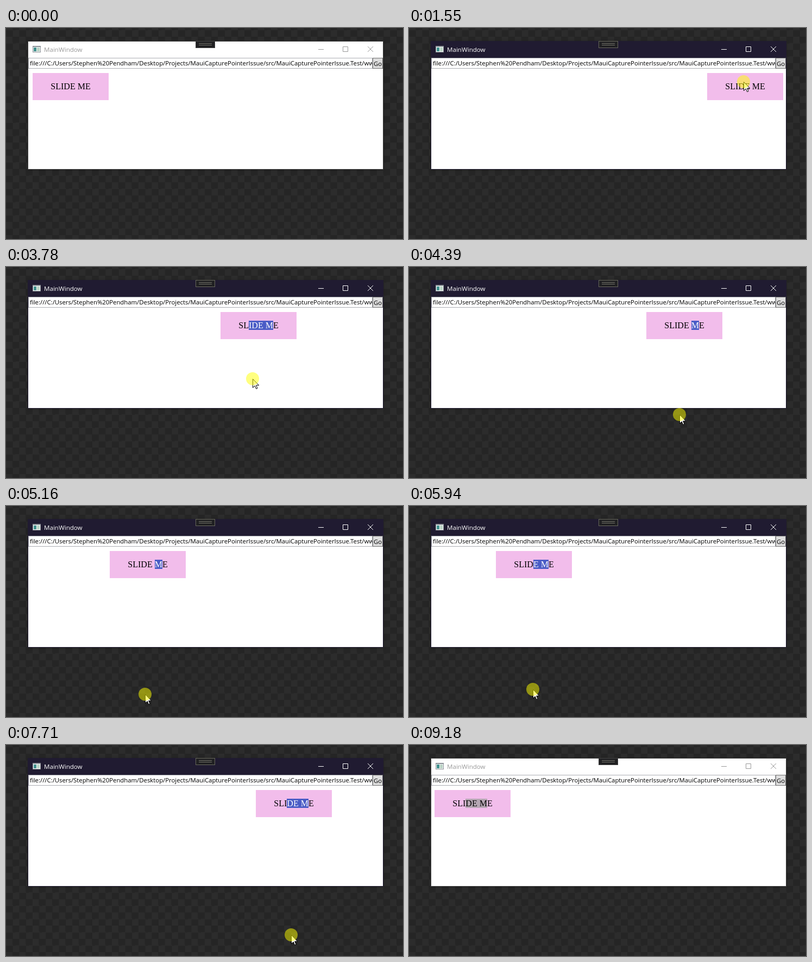
An HTML page that plays this animation: 731x389 px, repeating every 9.34 s.

```html
<!DOCTYPE html>
<html lang="en">
<head>
<meta charset="utf-8">
<title>Slide me</title>
<style>
html, body { margin: 0; width: 100%; height: 100%; overflow: hidden; }
body {
  position: relative;
  background: repeating-conic-gradient(#252525 0 25%, #2c2c2c 0 50%) 0 -8.4px / 24.4px 24.4px;
  font: 11.35px/19px "Open Sans", "Noto Sans", sans-serif;
  color: #000;
}
div, svg { position: absolute; box-sizing: border-box; }
#win {
  left: 41px; top: 25px; width: 653px; height: 235px;
  background: #fff; overflow: hidden;
  box-shadow: 0 0 0 1px #444, 0 1px 6px rgba(0, 0, 0, .3);
}
.active #win { box-shadow: 0 0 0 1px #201b31, 0 1px 6px rgba(0, 0, 0, .3); }
#bar { width: 653px; height: 30px; background: #fff; color: #999; }
.active #bar { background: #201b31; color: #fff; }
#name { left: 29px; top: 5px; font-size: 11.6px; }
#bar svg { left: 0; top: 0; }
#grip { left: 349px; top: 24px; width: 36px; height: 13px; background: #202022; border: 1px solid #444; }
.active #grip { border-color: #66665c; }
#grip::after {
  content: ""; position: absolute; left: 5px; top: 3px; width: 24px; height: 2px;
  border: solid #77776e; border-width: 1px 0;
}
#url {
  left: 0; top: 30px; width: 634px; height: 20px; padding-left: 2px; line-height: 17px;
  border: 1px solid #abadb3; overflow: hidden; white-space: nowrap;
}
#go { left: 634px; top: 30px; width: 19px; height: 20px; background: #ddd; border: 1px solid #707070; text-align: center; }
#go span { margin: 0 -2px; }
#box {
  left: 0; top: 58px; width: 140px; height: 50px; background: #f2bdeb;
  font: 16px/50px "Liberation Serif", serif; text-align: center; white-space: pre;
}
#sel { background: #b5a7b3; }
.active #sel { background: #4a5cc6; color: #fff; }
#mouse { left: 0; top: 0; overflow: visible; }
</style>
</head>
<body>
<div id="win">
  <div id="bar">
    <svg width="653" height="30" fill="none" stroke="currentColor">
      <g stroke="none">
        <path fill="#8a9096" d="M8 8h15v12H8z"/>
        <path fill="#f4f6f7" d="M9 10h13v9H9z"/>
        <path fill="#3f8f8c" d="M10 11h5v7h-5z"/>
        <path fill="#b9d3c4" d="M16 11h5v7h-5z"/>
      </g>
      <path d="M534 14.5h10M579.5 9.5h9v9h-9zM625 9l10 10M635 9l-10 10"/>
    </svg>
    <div id="name">MainWindow</div>
  </div>
  <div id="url">file:///C:/Users/Stephen%20Pendham/Desktop/Projects/MauiCapturePointerIssue/src/MauiCapturePointerIssue.Test/www</div>
  <div id="go"><span>Go</span></div>
  <div id="box"><span id="head"></span><span id="sel"></span><span id="tail"></span></div>
</div>
<div id="grip"></div>
<svg id="mouse" width="1" height="1">
  <path d="M.5 .5V16.5L4.2 13 6.6 18.6 9 17.6 6.6 12.1H11.6Z" fill="#fff" stroke="#000"/>
  <circle id="halo" r="12" fill="#ff0" opacity=".5"/>
</svg>
<script>
const LOOP = 9340, STEP = 1000 / 13, LABEL = "SLIDE ME", ANCHOR = 7;
const LEFT = 47, RIGHT = 550, PRESS = 860, STOP = 8010;

// Times at which the slide turns: it runs from one end to the other between them.
const turns = [1050, 1555, 2250, 2469, 3577, 4090, 4520, 4915, 5580, 6080, 6590, 7080, 7570, STOP];
const depth = [[300, 342], [800, 99], [2400, 99], [2885, 206], [3900, 206], [4915, 347],
  [5200, 347], [6300, 335], [6800, 335], [STOP, 353], [8400, 353], [8550, 389]];

const $ = id => document.getElementById(id);

function ease(keys, t) {
  const i = keys.findIndex(k => k[0] > t);
  if (i < 0) return keys[keys.length - 1][1];
  if (i === 0) return keys[0][1];
  const [t0, a] = keys[i - 1], [t1, b] = keys[i];
  return a + (b - a) * (1 - Math.cos(Math.PI * (t - t0) / (t1 - t0))) / 2;
}

// The slide rests at the left end between the third and fourth turn.
const path = [[PRESS, 49], ...turns.map((t, i) => [t, (i < 3 ? i : i - 1) % 2 ? RIGHT : LEFT])];
const boxX = t => ease(path, t);

// Where the pointer holds the box; it drifts slowly.
const grip = t => 64 + 5 * Math.cos((t - 6400) / 920);

function selectionStart(t) {
  if (t < 2680) return ANCHOR;
  const rising = boxX(t + 10) > boxX(t);
  return rising ? ANCHOR - 1 : Math.round((grip(t) - 49) / 5);
}

function draw(now) {
  const t = now % LOOP;
  // The picture ticks 13 times a second.
  const tick = Math.max(0, Math.floor((t - 5) / STEP) * STEP);
  const slide = Math.min(tick, STOP);
  const x = Math.round(boxX(slide));
  const mx = Math.round(x + grip(slide));
  const my = Math.round(ease(depth, tick));
  const start = selectionStart(slide);
  const show = (id, from, to) => $(id).style.display = t >= from && t < to ? "" : "none";

  document.body.className = t >= PRESS && t < 9180 ? "active" : "";
  $("box").style.left = x - 41 + "px";
  $("head").textContent = LABEL.slice(0, start);
  $("sel").textContent = LABEL.slice(start, ANCHOR);
  $("tail").textContent = LABEL.slice(ANCHOR);
  $("mouse").style.transform = `translate(${mx}px, ${my}px)`;
  show("mouse", 300, 8550);
  show("halo", PRESS, 8320);
}

const begin = performance.now();
function loop() {
  draw(performance.now() - begin);
  requestAnimationFrame(loop);
}
loop();
</script>
</body>
</html>
```
